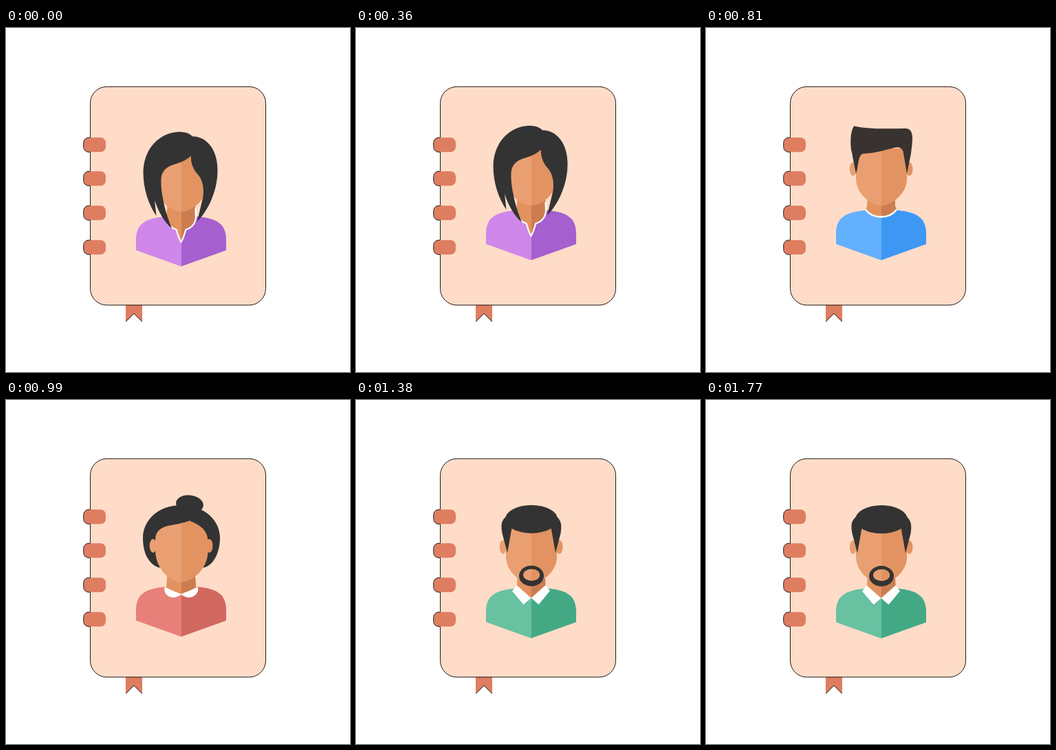
Animation, 500 px wide and 500 px high, one loop 1.83 s. Source, as an HTML page with a canvas:

```html
<!DOCTYPE html>
<html lang="en">
<head>
<meta charset="utf-8">
<title>Contact book</title>
<style>
html, body { margin: 0; width: 100%; height: 100%; overflow: hidden; background: #fff; }
canvas { display: block; }
</style>
</head>
<body>
<canvas id="stage" width="500" height="500"></canvas>
<script>
const ctx = document.getElementById('stage').getContext('2d');
const LOOP = 1830, STEP = 30, HOP = 15, MID = 255;
const HAIR = '#333333', SKIN = ['#e99f71', '#e29361'], NECK = ['#e2925e', '#cb7d4f'];
const PAPER = '#fedcc8', CLAY = '#df7d60', INK = '#1c1815';

function fill(d, color) {
  ctx.fillStyle = color;
  ctx.fill(new Path2D(d));
}

// Light left half, darker right half
function halves(d, [left, right]) {
  fill(d, left);
  ctx.save();
  ctx.beginPath();
  ctx.rect(MID, 0, 250, 500);
  ctx.clip();
  fill(d, right);
  ctx.restore();
}

function line(d, color, width) {
  ctx.strokeStyle = color;
  ctx.lineWidth = width;
  ctx.stroke(new Path2D(d));
}

function oval(x, y, rx, ry, color, turn = 0) {
  ctx.fillStyle = color;
  ctx.beginPath();
  ctx.ellipse(x, y, rx, ry, turn, 0, 7);
  ctx.fill();
}

function ears(y) {
  oval(213.7, y, 5, 10, SKIN[0]);
  oval(295.5, y, 5, 10, SKIN[1]);
}

const BODY = 'M254.5 346.5L189 323V309C189 287 199 277 231 274L254.5 280L278 274C310 277 320 287 320 309V323Z';
const FACE = 'M218 184V228C218 250 240 267 254.5 267C269 267 292 250 292 228V184Z';
const V_NECK = 'M235 250L234 270L254.5 288.5L275.5 270L274.5 250Z';

function longHair() {
  halves(BODY, ['#cf87ea', '#a55fcf']);
  const neck = 'M235 250L233 276C236 288 241 291 247.5 293C249 296 250 304 254.5 311C259 304 260 296 261.5 293C268 291 275 287 276 275L274.5 250';
  halves(neck, NECK);
  line('M233 276C236 288 241 291 247.5 293C249 296 250 304 254.5 311C259 304 260 296 261.5 293C268 291 275 287 276 275L275.5 262', '#fff', 2.2);
  halves(FACE, SKIN);
  fill('M271 157.5C265 151.5 257 151 251 151C222 152 199.5 177 199.5 210C199.5 235 208 258 218.5 273L216 250' +
    'C221 266 230 282 241 291.5C236 278 231 265 228.5 250C226 238 224.5 225 226 215C229 204 238 200 247 197.5' +
    'C256 195 263 191 269 186C268 196 273 207 279 213C286 221 288 233 286.5 245L278 281' +
    'C290 270 308 240 307.5 206C307.5 178 293 158 271 157.5Z', HAIR);
}

function quiff() {
  halves(BODY, ['#63b0ff', '#3e98f3']);
  const rim = 'M232 273Q240 283.5 254.5 283.5Q269 283.5 277 273';
  halves('M235 250L234 268L232 273Q240 283.5 254.5 283.5Q269 283.5 277 273L275 268L274.5 250Z', NECK);
  line(rim, '#fff', 2.4);
  ears(214);
  halves(FACE, SKIN);
  fill('M215 151.5C240 157 265 155 290 155C300 155 301 166 299.5 178L298 191L292 221L289 203L286.5 188' +
    'C284 182 278 181.5 272 183.5C255 188 243 191 230 191.5C223 191 222 201 220 213L218 221L212 190' +
    'C209.5 182 210 166 211.5 161C212.5 156 214 153 215 151.5Z', '#383330');
}

function bun() {
  halves(BODY, ['#e8807a', '#d1685f']);
  halves('M235 250L233 275L254.5 285L276 275L274.5 250Z', NECK);
  fill('M231 274C227 283 238 292 247 289C251 287.5 254.5 286 254.5 284.5C248 282 238 278 231 274Z', '#fff');
  fill('M278.5 274C282.5 283 271 292 262.5 289C258 287.5 254.5 286 254.5 284.5C261 282 271 278 278.5 274Z', '#fff');
  oval(267, 154, 20, 13, HAIR, 0.12);
  fill('M255 155.5C222 155 199 177 199 203C199 226 208 241 222 246L288 246C301 243 311 225 311 203C311 177 288 155.5 255 155.5Z', HAIR);
  ears(214.5);
  halves('M217 206C217 193 225 187 240 184.5C255 182 262 180 267 178C276 183 292 187 293.5 207V222' +
    'C293 250 269 267 254.5 267C240 267 218 250 217 222Z', SKIN);
}

function goatee() {
  halves(BODY, ['#68c1a1', '#43a985']);
  halves(V_NECK, NECK);
  fill('M233.5 269.5L227 278L243.5 297.5L254.5 288Z', '#fff');
  fill('M275.5 269.5L282 277.5L265.5 297.5L254.5 288Z', '#fff');
  ears(214);
  halves(FACE, SKIN);
  oval(255, 173.5, 38, 20.5, HAIR);
  fill('M218 170C210 176 211 184 212.5 194L220 222.5L226.5 186L230 180Z', HAIR);
  fill('M292 170C299 176 299 184 297.5 194L290 222.5L283.5 186L280 180Z', HAIR);
  oval(255, 256, 18, 15, HAIR);
  halves('M243 254.5A12 8.5 0 0 1 267 254.5A12 8.5 0 0 1 243 254.5Z', SKIN);
}

const people = [longHair, quiff, bun, goatee];

function box(x, y, w, h, r) {
  ctx.beginPath();
  ctx.roundRect(x, y, w, h, r);
}

function book() {
  ctx.fillStyle = '#fff';
  ctx.fillRect(0, 0, 500, 500);
  fill('M174 402H198V427L186 415L174 427Z', CLAY);
  line('M174.2 426.7L186 415L197.8 426.7', INK, 1);

  box(122.5, 85.3, 255, 317.5, 24);
  ctx.fillStyle = PAPER;
  ctx.fill();
  ctx.strokeStyle = INK;
  ctx.lineWidth = 1;
  ctx.stroke();

  for (const y of [159, 208, 258, 308]) {
    box(113, y + 0.3, 32, 21, 7.5);
    ctx.fillStyle = CLAY;
    ctx.fill();
    // Only the part outside the cover is outlined
    ctx.save();
    ctx.beginPath();
    ctx.rect(100, y - 5, 22, 32);
    ctx.clip();
    box(112.7, y + 0.3, 32, 21, 7.5);
    ctx.strokeStyle = INK;
    ctx.stroke();
    ctx.restore();
  }
}

// Soft rise for ten steps, then a quick fall
function lift(k) {
  if (k <= 10) {
    const u = k / 10;
    return 12 * u * u * (3 - 2 * u);
  }
  const u = Math.min(1, (k - 10) / 4);
  return 12 * (1 - u * u);
}

function draw(ms) {
  const i = Math.min(59, Math.floor((ms % LOOP) / STEP));
  book();
  ctx.save();
  ctx.translate(0, -lift(i % HOP));
  people[Math.floor(i / HOP)]();
  ctx.restore();
}

const start = performance.now();
function tick() {
  draw(performance.now() - start);
  requestAnimationFrame(tick);
}
tick();
</script>
</body>
</html>
```
